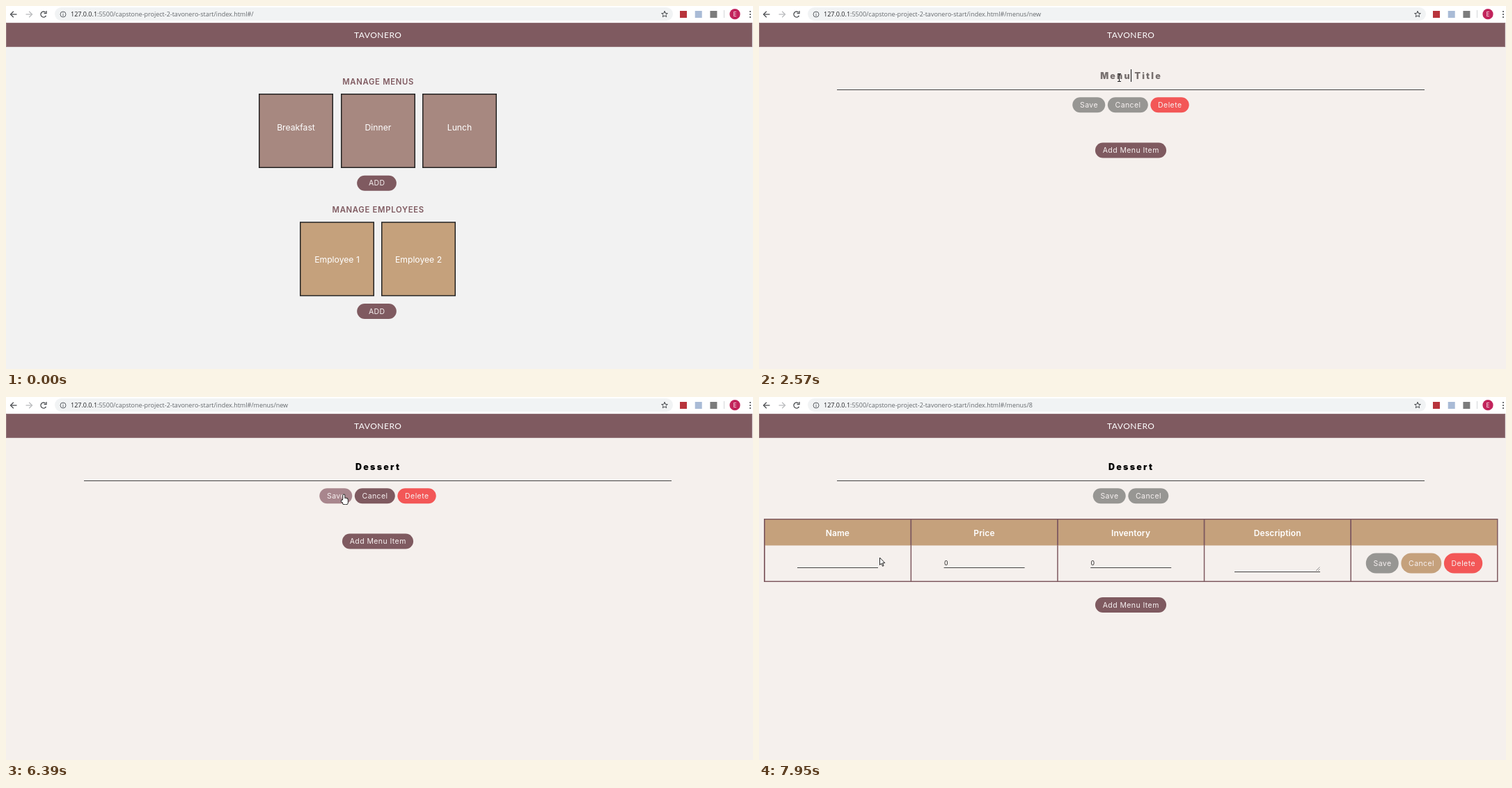
These frames come from a looping animation (1073x522 px, 8 s). An HTML page with a canvas:

```html
<!DOCTYPE html>
<html lang="en">
<head>
<meta charset="utf-8">
<title>Menu manager</title>
<style>
html, body { margin: 0; width: 100%; height: 100%; overflow: hidden; }
canvas { display: block; }
</style>
</head>
<body>
<canvas id="stage" width="1073" height="522"></canvas>
<script>
const ctx = document.getElementById('stage').getContext('2d');
const LOOP = 8000, MID = 534;
const PLUM = '#7f5a60', PLUM_LIGHT = '#a8868d', TAN = '#c5a17c', ROSE = '#a78880';
const RED = '#f35757', GREY = '#979693', INK = '#222', ICON = '#4d5053', PAPER = '#f5f0ed';
const SANS = 'Inter, sans-serif', UI = '9px "Open Sans", sans-serif';
const LABEL = '400 10.5px ' + SANS, LABEL_GAP = 0.42;

// Spells of activity in screen updates; the pointer runs along a bent path to "to"
const bursts = [
  { start: 360, end: 1160, steps: 10, bend: [700, 60], to: [548, 206] },
  { start: 1230, end: 1470, steps: 3, bend: [547, 230], to: [545.5, 253] },
  { start: 1790, end: 2570, steps: 10, bend: [465, 85], to: [517, 103] },
  { start: 3490, end: 3720, steps: 3 },
  { start: 5770, end: 6550, steps: 10, bend: [505, 120], to: [485, 142] },
  { start: 6630, end: 7410, steps: 10, bend: [541, 172], to: [532, 250] },
  { start: 7500, end: 7950, steps: 6, bend: [350, 252], to: [173.5, 231] }
];
const ENTRY = [997, 424];
const WORD = 'Dessert';
const keyTimes = [3490, 4270, 4570, 4740, 4870, 5120, 5270];
const OPENED = 1390, CLICKED = 2490, SAVED = 6550, ADDED = 7500;

let mouse = null, pointing = false;

// Time of the latest screen update, and the pointer's place at it
function stateAt(t) {
  let time = 0, from = ENTRY, spot = null;
  for (const { start, end, steps, bend, to } of bursts) {
    if (t < start) break;
    const step = (end - start) / steps;
    const n = Math.min(steps, Math.floor((t - start + 5) / step));
    time = start + n * step;
    if (!to) continue;
    const k = 1 - (1 - n / steps) ** 3;
    spot = [0, 1].map(i => from[i] * (1 - k) ** 2 + 2 * bend[i] * k * (1 - k) + to[i] * k * k);
    from = to;
  }
  return { time, spot };
}

function mix(a, b, k) {
  const part = (c, i) => parseInt(c.slice(i, i + 2), 16);
  return 'rgb(' + [1, 3, 5].map(i => Math.round(part(a, i) + (part(b, i) - part(a, i)) * k)) + ')';
}

function rect(x, y, w, h, color) {
  ctx.fillStyle = color;
  ctx.fillRect(x, y, w, h);
}

function pill(x, y, w, h, r, color) {
  ctx.fillStyle = color;
  ctx.beginPath();
  ctx.roundRect(x, y, w, h, r);
  ctx.fill();
}

function arc(x, y, r, color, width, from = 0, to = 7) {
  ctx.strokeStyle = ctx.fillStyle = color;
  ctx.lineWidth = width;
  ctx.beginPath();
  ctx.arc(x, y, r, from, to);
  if (width) ctx.stroke(); else ctx.fill();
}

function line(points, color, width = 1.3) {
  ctx.strokeStyle = color;
  ctx.lineWidth = width;
  ctx.beginPath();
  points.forEach(([x, y]) => ctx.lineTo(x, y));
  ctx.stroke();
}

function textWidth(str, font, gap) {
  ctx.font = font;
  ctx.letterSpacing = gap + 'px';
  return ctx.measureText(str).width;
}

function text(str, x, y, font, color, gap = 0, align = 'center') {
  const width = textWidth(str, font, gap);
  ctx.textAlign = align;
  ctx.fillStyle = color;
  ctx.fillText(str, align === 'center' ? x + gap / 2 : x, y);
  return width;
}

const over = (x, y, w, h) =>
  mouse && mouse[0] >= x && mouse[0] <= x + w && mouse[1] >= y && mouse[1] <= y + h;

// Buttons sized by their labels, centred as a row on x
function buttonRow(x, y, h, items, pad = 10.5, space = 3.6) {
  const widths = items.map(([label]) => textWidth(label, LABEL, LABEL_GAP) + pad * 2);
  let left = x - (widths.reduce((a, b) => a + b) + space * (items.length - 1)) / 2;
  items.forEach(([label, color], i) => {
    const w = widths[i];
    const hot = color === PLUM && over(left, y, w, h);
    if (hot) pointing = true;
    pill(left, y, w, h, h / 2, hot ? PLUM_LIGHT : color);
    text(label, left + w / 2, y + h / 2 + 3.7, LABEL, '#f7f1f1', LABEL_GAP);
    left += w + space;
  });
}

function cardRow(y, color, names, base) {
  const pitch = 117.6, size = 107;
  names.forEach((name, i) => {
    const x = Math.round(MID + (i - names.length / 2) * pitch + 5.3);
    if (over(x, y, size, size)) pointing = true;
    rect(x, y, size, size, INK);
    rect(x + 1.5, y + 1.5, size - 3, size - 3, color);
    text(name, x + size / 2, base, '400 12.2px ' + SANS, '#fff');
  });
}

function arrowIcon(x, dir, color) {
  line([[x - 4.5, 12], [x + 4.5, 12]], color);
  const tip = x + dir * 4.5;
  line([[tip - dir * 4.3, 7.7], [tip, 12], [tip - dir * 4.3, 16.3]], color);
}

function toolbar(url, loading, dimmed) {
  rect(0, 0, 1073, 24, '#fff');
  pill(70, 2, 888, 19, 9.5, '#f1f3f4');
  arrowIcon(11, -1, ICON);
  arrowIcon(33, 1, '#babcbe');
  if (loading) {
    line([[50.5, 8], [58, 15.5]], ICON);
    line([[58, 8], [50.5, 15.5]], ICON);
  } else {
    arc(54, 12, 4, ICON, 1.4, 0.5, 5.4);
    line([[58, 7], [58, 10.5], [54.5, 10.5]], ICON);
  }
  arc(82, 12, 4, '#5f6368', 1);
  rect(81.5, 11.5, 1, 3, '#5f6368');
  rect(81.5, 9.5, 1, 1, '#5f6368');
  const hostWidth = text('127.0.0.1', 93, 15, UI, '#202124', 0, 'left');
  text(':5500/capstone-project-2-tavonero-start/index.html#/' + url,
    93 + hostWidth, 15, UI, '#65696d', 0, 'left');
  line(Array.from({ length: 12 }, (_, i) => {
    const a = i * Math.PI / 5, r = i % 2 ? 2 : 4.6;
    return [946 + Math.sin(a) * r, 12 - Math.cos(a) * r];
  }), ICON, 1);
  [dimmed ? '#e8e8e8' : '#b8343c', '#a9bbd6', '#7c7c7c'].forEach((c, i) =>
    rect(968 + i * 21.7, 7, 10, 10, c));
  rect(1031, 6, 1, 11, '#d5d7d9');
  arc(1047, 11.7, 7.6, '#c2245c');
  text('E', 1047, 15, UI, '#fff');
  for (let y = 8; y <= 16; y += 4) arc(1069, y, 1.1, ICON);
}

function header() {
  rect(0, 24, 1072, 35, '#96787d');
  rect(1, 25, 1070, 33, PLUM);
  text('TAVONERO', MID, 46, '400 12px Lato, sans-serif', '#fff', 0.5);
}

function section(title, y, color, names, base) {
  text(title, MID + 0.3, y, '600 11.3px ' + SANS, PLUM, 0.7);
  cardRow(y + 13, color, names, base);
  buttonRow(MID - 1.5, y + 130.7, 22, [['ADD', PLUM]], 16.5);
}

function home() {
  section('MANAGE MENUS', 113, ROSE, ['Breakfast', 'Dinner', 'Lunch'], 178.5);
  section('MANAGE EMPLOYEES', 297.3, TAN, ['Employee 1', 'Employee 2'], 368.5);
}

function titleField(t) {
  const typed = WORD.slice(0, keyTimes.filter(k => t >= k).length);
  const width = text(typed || 'Menu Title', MID - 0.5, 105, '900 12.5px ' + SANS,
    typed ? '#000' : '#77706f', 2.2);
  rect(112, 120, 844, 1, '#444');
  // The caret blinks from the latest click or key press
  const last = [CLICKED, ...keyTimes].filter(k => t >= k).pop();
  if (t < 5770 && (t - last) % 1060 < 545) {
    rect(Math.round(MID + (typed ? width / 2 : 0)), 91, 1, 18, '#111');
  }
}

function table(open) {
  const left = 7, top = 175, pitch = 210.6, bottom = open ? 266 : 215;
  rect(left, top, pitch * 5 + 1.5, bottom - top, PLUM);
  if (open) rect(left + 1.5, 213, pitch * 5 - 1.5, 51.5, PAPER);
  ['Name', 'Price', 'Inventory', 'Description', ''].forEach((name, i) => {
    const x = left + i * pitch;
    rect(x + 1.5, top + 1.5, pitch - 1.5, 37, TAN);
    rect(x, top, 1.5, bottom - top, PLUM);
    text(name, x + pitch / 2 + 0.5, 199.5, '600 12px ' + SANS, '#fff', 0.1);
    if (!open || i > 2) return;
    rect(x + 48, 245, 116, 1, '#444');
    if (i) text('0', x + 48.3, 242.3, '400 8.8px ' + SANS, INK, 0, 'left');
  });
  if (!open) return;
  rect(683, 251, 123, 1, '#444');
  for (const d of [2.5, 5.5]) line([[805.5 - d, 250], [805.5, 250 - d]], '#777', 0.8);
  buttonRow(955.5, 224.5, 29, [['Save', GREY], ['Cancel', TAN], ['Delete', RED]]);
}

function editor(t, time) {
  const saved = time >= SAVED, open = time >= ADDED;
  const k = time < keyTimes[0] || saved ? 0 : Math.min(1, (time - 3430) / 290);
  const tone = k === 1 ? PLUM : mix(GREY, PLUM, k);
  const actions = [['Save', tone], ['Cancel', tone], ['Delete', RED]];
  titleField(t);
  buttonRow(MID, 131.2, 22, open ? actions.slice(0, 2) : actions);
  if (saved) table(open);
  buttonRow(MID, open ? 288 : saved ? 236.5 : 196.5, 22, [['Add Menu Item', PLUM]]);
}

function handCursor(x, y) {
  for (const [grow, color] of [[0.9, INK], [0, '#fff']]) {
    const part = (dx, dy, w, h, r) =>
      pill(x + dx - grow, y + dy - grow, w + grow * 2, h + grow * 2, r + grow, color);
    part(-1, -1.2, 2, 9, 1);
    part(-3.5, 6.5, 3, 3, 1.5);
    part(-1.5, 4, 7, 8.5, 2.5);
  }
}

function arrowCursor(x, y) {
  ctx.beginPath();
  [[0, 0], [0, 10.5], [2.4, 8.3], [4, 12.3], [5.6, 11.6], [4, 7.8], [7.3, 7.6]]
    .forEach(([dx, dy]) => ctx.lineTo(x + dx, y + dy));
  ctx.closePath();
  ctx.fillStyle = '#fff';
  ctx.fill();
  ctx.strokeStyle = INK;
  ctx.lineWidth = 1;
  ctx.stroke();
}

function beamCursor(x, y) {
  for (const d of [-5.5, 5.5]) rect(x - 2, y + d - 0.5, 5, 1, INK);
  rect(x, y - 5, 1, 10, INK);
}

function pointer(inEditor) {
  if (!mouse) return;
  const [x, y] = mouse;
  const cursor = inEditor && y > 86 && y < 120 ? beamCursor : pointing ? handCursor : arrowCursor;
  cursor(x, y);
}

function draw(t) {
  const { time, spot } = stateAt(t);
  const atHome = time < OPENED, saved = time >= SAVED;
  mouse = spot;
  pointing = false;
  rect(0, 0, 1073, 522, atHome ? '#f2f2f2' : PAPER);
  toolbar(atHome ? '' : saved ? 'menus/8' : 'menus/new',
    saved && time < SAVED + 150, saved && time < SAVED + 470);
  header();
  if (atHome) home(); else editor(t, time);
  pointer(!atHome);
}

const begin = performance.now();
function frame() {
  draw((performance.now() - begin) % LOOP);
  requestAnimationFrame(frame);
}
frame();
</script>
</body>
</html>
```
